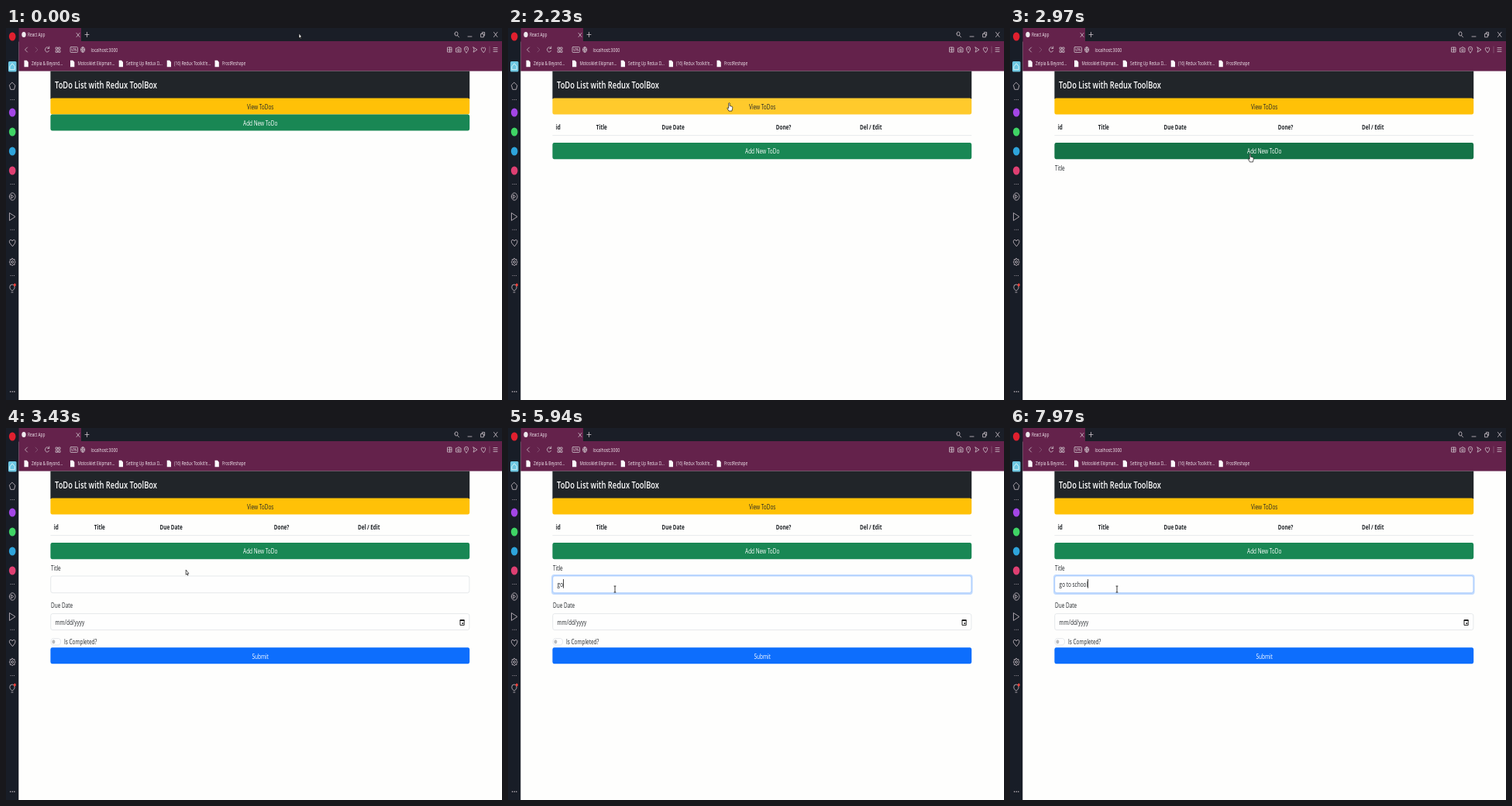
Write an HTML page that moves like this. It is 640 px wide and 480 px high and loops after 8000 ms.

```html
<!DOCTYPE html>
<html lang="en">
<head>
<meta charset="utf-8">
<title>ToDo List</title>
<style>
  html, body { margin: 0; width: 100%; height: 100%; overflow: hidden; background: #fefefd; }
  svg { display: block; width: 100vw; height: 100vh; }
  text { font-family: "Open Sans", "Noto Sans", sans-serif; white-space: pre; }
  .line { fill: none; stroke: #cdc3cb; stroke-width: .8; stroke-linejoin: round; stroke-linecap: round; }
  .field { fill: #fefefe; stroke: #d6dade; stroke-width: .6; }
</style>
</head>
<body>
<svg viewBox="0 0 640 480">
  <defs>
    <clipPath id="tableClip"><rect id="tableWindow" x="50" y="111.5" width="560" height="0"/></clipPath>
    <clipPath id="formClip"><rect id="formWindow" x="50" y="132.6" width="560" height="0"/></clipPath>
  </defs>

  <rect width="640" height="480" fill="#fefefd"/>

  <g id="browser">
    <rect width="640" height="17" fill="#1a1e27"/>
    <rect x="16.3" width="80.7" height="18" fill="#64224b"/>
    <rect x="16.3" y="17" width="623.7" height="38.6" fill="#64224b"/>
    <rect width="16.3" height="480" fill="#181d27"/>
    <ellipse cx="23" cy="8.5" rx="2.7" ry="3.6" fill="#eee9ee"/>
    <g class="line">
      <path d="M91 6.5l4 5m0-5l-4 5M102 8.5h5m-2.5-3v6"/>
      <path d="M27.5 25l-3 3 3 3"/>
      <path d="M38 25l3 3-3 3" opacity=".35"/>
      <path d="M55.3 26a2.6 3.2 0 1 0 .2 3.3M55.7 24v2.5h-2"/>
      <path d="M64.5 25h2v2.4h-2zM68 25h2v2.4h-2zM64.5 29h2v2.4h-2zM68 29h2v2.4h-2z"/>
      <rect x="83" y="24.5" width="9.5" height="7" rx="1"/>
      <path d="M96.5 28a2.6 3.4 0 1 0 5.2 0a2.6 3.4 0 1 0-5.2 0h5.2M99.1 24.6q-2.4 3.4 0 6.8q2.4-3.4 0-6.8"/>
      <path d="M570 25h5v6h-5zM570 28h5M572.5 25v6"/>
      <path d="M581 26h1.5l.7-1.2h1.8l.7 1.2h1.3v5h-6zM582.8 28.5a1.2 1.5 0 1 0 2.4 0a1.2 1.5 0 1 0-2.4 0"/>
      <path d="M594 32q-2.6-3-2.6-5a2.6 2.8 0 0 1 5.2 0q0 2-2.6 5M593.2 27h1.6"/>
      <path d="M603 24.8l5 3.2-5 3.2 1-3.2z"/>
      <path d="M616 31.5l-2.5-3.2q-1-3 1-3.2 1 0 1.5 1.3.5-1.3 1.5-1.3 2 .2 1 3.2z"/>
      <path d="M624 24v8" opacity=".35"/>
      <path d="M629 25.5h5M629 28h5M629 30.5h5"/>
      <path d="M579 7.5a2 2.6 0 1 0 4 0a2 2.6 0 1 0-4 0M582.5 9.5l2 2.4M596 11h5"/>
      <path d="M613 7.5h3.3v4.3h-3.3zM614.3 7.5v-2h3.3v4.3h-1.3M629.5 5.5l4.5 6m0-6l-4.5 6"/>
    </g>
    <g id="sidebar">
      <ellipse cx="8.2" cy="11" rx="4.3" ry="5.5" fill="#e0202f"/>
      <rect x="3" y="43" width="10.5" height="13.5" rx="1.5" fill="#6cc6e2"/>
      <path class="line" style="stroke:#f4ffff" d="M5.2 49.5l3-3.7 3 3.7v4.2h-6z"/>
      <g class="line">
        <path d="M8.2 70.5l3.7 3.6-1.4 5.2h-4.6l-1.4-5.2z"/>
        <path d="M6 92.5h.1m2.1 0h.1m2.1 0h.1M6 201.5h.1m2.1 0h.1m2.1 0h.1M6 260.3h.1m2.1 0h.1m2.1 0h.1M6 319.5h.1m2.1 0h.1m2.1 0h.1"/>
        <path d="M4.4 217.5a3.8 4.7 0 1 0 7.6 0a3.8 4.7 0 1 0-7.6 0M7.1 215.3l2.7 2.2-2.7 2.2z"/>
        <path d="M4.8 238.8l7.2 4.7-7.2 4.7z"/>
        <path d="M8.2 281.5l-3.3-4q-1.5-3.8 1.2-4.2 1.5 0 2.1 1.7.6-1.7 2.1-1.7 2.7.4 1.2 4.2z"/>
        <path d="M8.2 297.2l1 1.4 1.8-.1.1 2 1 1.5-1 1.5-.1 2-1.8-.1-1 1.4-1-1.4-1.8.1-.1-2-1-1.5 1-1.5.1-2 1.8.1zM6.9 302a1.3 1.6 0 1 0 2.6 0a1.3 1.6 0 1 0-2.6 0"/>
        <path d="M7 338.5q-2.2-1.8-2.2-4a3.2 3.6 0 0 1 6.4 0q0 2.2-2.2 4zM7 341h2"/>
        <path d="M5.6 469.3h.1m2.5 0h.1m2.5 0h.1" stroke-width="1.4"/>
      </g>
      <ellipse cx="11.3" cy="331.5" rx="1.5" ry="1.9" fill="#f0403a"/>
    </g>
  </g>

  <rect x="57.4" y="55.6" width="540.8" height="36" fill="#212529"/>
  <rect id="viewButton" x="57.4" y="90.4" width="540.8" height="21.1" rx="2.3" ry="3"/>
  <g id="table" clip-path="url(#tableClip)">
    <path d="M57.4 138.6h540.8" stroke="#dfe2e5" stroke-width=".7"/>
  </g>

  <g id="lower">
    <rect id="addButton" x="57.4" y="111.5" width="540.8" height="21.1" rx="2.3" ry="3"/>
    <g clip-path="url(#formClip)">
      <g id="form">
        <rect id="glow" x="56" y="152.3" width="543.6" height="26" rx="3.4" ry="4" fill="#c2dbfe"/>
        <rect id="titleField" class="field" x="57.7" y="154.4" width="540.2" height="21.7" rx="2.2" ry="3"/>
        <rect class="field" x="57.7" y="203" width="540.2" height="21" rx="2.2" ry="3"/>
        <path d="M586 211.5h5.2v6.3h-5.2z" fill="none" stroke="#111" stroke-width=".9"/>
        <path d="M585.7 211.5h5.8M588.5 215.5h1.6" stroke="#111" stroke-width="1.7"/>
        <rect class="field" x="58" y="235" width="12.5" height="8.4" rx="3.2" ry="4.2"/>
        <ellipse cx="61.4" cy="239.2" rx="2" ry="2.6" fill="#b9bbbd"/>
        <rect x="57.4" y="246.6" width="540.8" height="21.1" rx="2.3" ry="3" fill="#0d6efd"/>
        <rect id="caret" y="158.5" width=".8" height="11.5" fill="#111"/>
      </g>
    </g>
  </g>

  <g id="pageText"></g>

  <g id="pointer" stroke="#111" stroke-width=".7" stroke-linejoin="round" fill="#fff">
    <path id="arrow" d="M0 0v6.2l1.2-1.2.9 2.1.8-.5-.8-2h1.6z"/>
    <path id="hand" d="M-.8 .6q.8-1.2 1.5 0v3.4l3 .8q.8.4.5 2.2l-.8 3.6h-4l-2-3.6q-.2-1.3 1.8 0z"/>
    <path id="beam" fill="none" stroke-width=".8" d="M-1.4-4h2.8M0-4v8M-1.4 4h2.8"/>
  </g>
</svg>

<script>
const $ = id => document.getElementById(id);
const NS = "http://www.w3.org/2000/svg";
const ASPECT = 0.75;            // the 16:9 screen is shown on a 4:3 stage
const BODY = 8.6, SMALL = 6.4;
const INK = "#212529", PALE = "#f2eaf0";

function add(parent, name, attrs) {
  const node = parent.appendChild(document.createElementNS(NS, name));
  for (const key in attrs) node.setAttribute(key, attrs[key]);
  return node;
}

function label(parent, x, y, words, size = BODY, fill = INK, more = {}) {
  const node = add($(parent), "text", {
    transform: `translate(${x} ${y}) scale(${ASPECT} 1)`, "font-size": size, fill, ...more
  });
  node.textContent = words;
  return node;
}

const centred = { "text-anchor": "middle" };

// Browser chrome
label("browser", 28, 11, "React App", SMALL, PALE);
label("browser", 109.5, 30.5, "localhost:3000", 6.9, PALE);
label("browser", 87.8, 30, "VPN", 4.8, PALE, centred);
[[23.5, "Zelpia & Beyond..."], [83, "Motosiklet Ekipman..."], [145.7, "Setting Up Redux D..."],
 [207.7, "(16) Redux Toolkit'e..."], [269.5, "FrostReshape"]].forEach(([x, words]) => {
  add($("browser"), "path", { d: `M${x} 41.7h3.3l2 2.4v6.2h-5.3z`, fill: "#fdfbfd" });
  label("browser", x + 9.4, 48.3, words, SMALL, PALE);
});
[[109, "#a346e6"], [134, "#3fd465"], [159, "#2ea4dc"], [184, "#de3f72"]].forEach(([cy, fill]) =>
  add($("sidebar"), "ellipse", { cx: 8.2, cy, rx: 4.3, ry: 5.6, fill }));

// Page
label("pageText", 63, 78.3, "ToDo List with Redux ToolBox", 12.45, "#fff", { "font-weight": 600 });
label("pageText", 328.2, 104.8, "View ToDos", BODY, INK, centred);
[[61.7, "id"], [113.8, "Title"], [198.6, "Due Date"], [345.8, "Done?"], [454, "Del / Edit"]]
  .forEach(([x, words]) => label("table", x, 131, words, 8.45, INK, { "font-weight": 700 }));
label("lower", 328.2, 125.6, "Add New ToDo", BODY, "#fff", centred);
label("form", 58, 147.4, "Title");
label("form", 58, 195.3, "Due Date");
label("form", 63.6, 217, "mm/dd/yyyy");
label("form", 75, 242.8, "Is Completed?");
label("form", 328.2, 261, "Submit", BODY, "#fff", centred);
const typed = label("form", 63.6, 168.8, "");

const clamp = v => Math.min(1, Math.max(0, v));
const mix = (a, b, k) => a + (b - a) * k;
const mixColour = (a, b, k) => `rgb(${a.map((v, i) => Math.round(mix(v, b[i], k)))})`;
const between = (t, a, b) => t >= a && t < b;

// CSS "ease": cubic-bezier(.25, .1, .25, 1)
function ease(x) {
  x = clamp(x);
  const bezier = (s, p, q) => 3 * s * (1 - s) ** 2 * p + 3 * s * s * (1 - s) * q + s ** 3;
  let low = 0, high = 1;
  for (let i = 0; i < 20; i++) {
    const mid = (low + high) / 2;
    if (bezier(mid, .25, .25) < x) low = mid; else high = mid;
  }
  return bezier(low, .1, 1);
}
const fade = (t, from, to = Infinity) => ease((t - from) / 150) - ease((t - to) / 150);

const LOOP = 8000, COLLAPSE = 350;
const TABLE_OPEN = 1790, FORM_OPEN = 2925, FOCUS = 3800;
const MESSAGE = "go to school", FIRST_KEY = 5650, KEY_GAP = 195;
const PATH = [[150, 378, 7], [800, 345, 55], [1450, 286, 93], [1700, 284.5, 93], [2100, 285.5, 96.5],
              [2330, 285.5, 96.5], [2750, 310, 162], [3150, 310, 162.5], [3750, 138, 208]];

function pointerAt(t) {
  const next = PATH.findIndex(p => p[0] > t);
  if (next < 0) return PATH[PATH.length - 1].slice(1);
  if (next === 0) return PATH[0].slice(1);
  const [t0, x0, y0] = PATH[next - 1], [t1, x1, y1] = PATH[next];
  const u = (t - t0) / (t1 - t0), k = u * u * (3 - 2 * u);
  return [mix(x0, x1, k), mix(y0, y1, k)];
}

function draw(t) {
  const tableHeight = 36.6 * ease((t - TABLE_OPEN) / COLLAPSE);
  $("tableWindow").setAttribute("height", tableHeight);
  $("lower").setAttribute("transform", `translate(0 ${tableHeight})`);
  $("formWindow").setAttribute("height", 137 * ease((t - FORM_OPEN) / COLLAPSE));

  $("viewButton").setAttribute("fill", mixColour([255, 193, 7], [255, 202, 44], fade(t, 1700, 2450)));
  $("addButton").setAttribute("fill", mixColour([25, 135, 84], [21, 115, 71], fade(t, 2620, 3220)));

  const focus = fade(t, FOCUS);
  $("glow").setAttribute("opacity", focus);
  $("titleField").style.stroke = mixColour([214, 218, 222], [134, 183, 254], focus);

  const keys = t < FIRST_KEY ? 0 : Math.min(MESSAGE.length, 1 + Math.floor((t - FIRST_KEY) / KEY_GAP));
  typed.textContent = MESSAGE.slice(0, keys);
  const caretSince = keys ? FIRST_KEY + (keys - 1) * KEY_GAP : FOCUS;
  const caretOn = t >= FOCUS && (t - caretSince) % 1000 < 500;
  $("caret").setAttribute("visibility", caretOn ? "visible" : "hidden");
  $("caret").setAttribute("x", 63.8 + (keys ? typed.getComputedTextLength() * ASPECT : 0));

  const shape = t >= 3680 ? "beam" : between(t, 1430, 2450) || between(t, 2620, 3220) ? "hand" : "arrow";
  for (const id of ["arrow", "hand", "beam"]) $(id).style.display = id === shape ? "" : "none";
  $("pointer").setAttribute("transform", `translate(${pointerAt(t)})`);
}

const start = performance.now();
function tick() {
  draw((performance.now() - start) % LOOP);
  requestAnimationFrame(tick);
}
tick();
</script>
</body>
</html>
```
